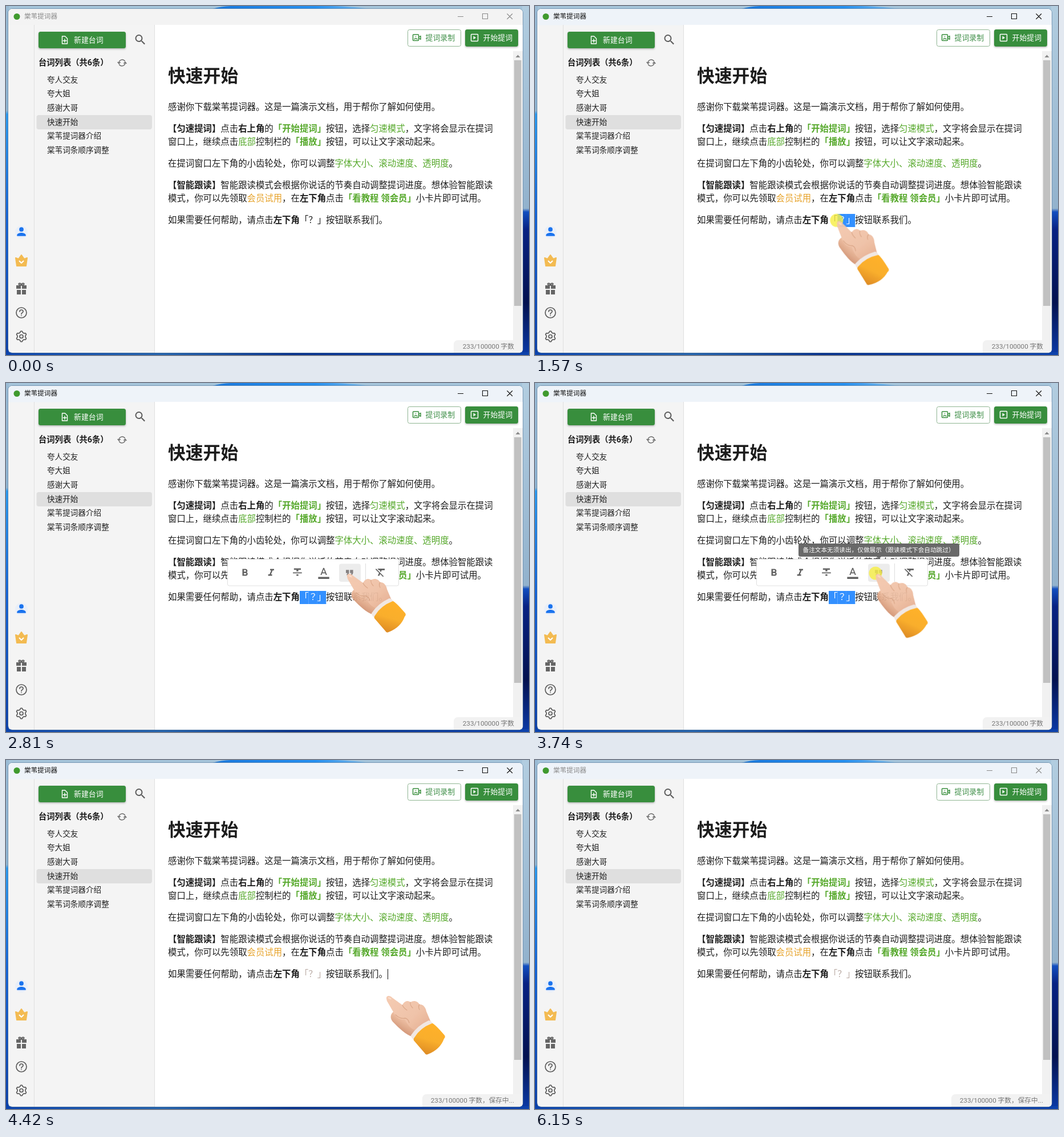
Recreate the animation shown at these times as an HTML page. Size 917 px wide and 611 px high, loop 6.22 s.

```html
<!DOCTYPE html>
<html lang="zh-CN">
<head>
<meta charset="utf-8">
<title>提词器备注演示</title>
<style>
html, body { margin: 0; width: 100%; height: 100%; overflow: hidden; }
svg { display: block; width: 917px; height: 611px; }
text {
  font-family: Roboto, "Noto Sans CJK SC", "Noto Sans CJK", sans-serif;
  white-space: pre; text-spacing-trim: space-all; font-kerning: none;
}
.doc text, .pick text { font-size: 15.4px; }
.doc { fill: #1c1c1c; }
.list { font-size: 13.6px; fill: #222; }
.btn { font-size: 12.9px; font-weight: 500; }
.status { font-size: 11.7px; fill: #757575; text-anchor: end; }
.b { font-weight: 700; }
.g { fill: #55a82a; }
.o { fill: #e6a229; }
.mid { font-family: "Noto Sans CJK TC", "Noto Sans CJK", sans-serif; }
.line { fill: none; stroke-linecap: round; stroke-linejoin: round; }
</style>
</head>
<body>
<svg viewBox="0 0 917 611" xmlns="http://www.w3.org/2000/svg">
  <defs>
    <linearGradient id="leftSky" x2="0" y2="1">
      <stop offset="0" stop-color="#9abbd5"/><stop offset=".3" stop-color="#8fb4d2"/>
      <stop offset=".31" stop-color="#2a9af0"/><stop offset=".6" stop-color="#1263d8"/>
      <stop offset="1" stop-color="#0a3ea8"/>
    </linearGradient>
    <linearGradient id="rightSky" x2="0" y2="1">
      <stop offset="0" stop-color="#b2cde0"/><stop offset=".58" stop-color="#92b2cd"/>
      <stop offset=".59" stop-color="#124ec0"/><stop offset=".64" stop-color="#082283"/>
      <stop offset=".85" stop-color="#041250"/><stop offset="1" stop-color="#0b3aa6"/>
    </linearGradient>
    <linearGradient id="bottomSky">
      <stop offset="0" stop-color="#0b43ac"/><stop offset=".3" stop-color="#2463ac"/>
      <stop offset=".55" stop-color="#07318c"/><stop offset="1" stop-color="#0d42ac"/>
    </linearGradient>
    <linearGradient id="topSky">
      <stop offset="0" stop-color="#1a78dc"/><stop offset=".65" stop-color="#2690f0"/>
      <stop offset="1" stop-color="#7fbbe8"/>
    </linearGradient>
    <linearGradient id="skin" x2="1" y2="1">
      <stop offset="0" stop-color="#f5c8ae"/><stop offset=".55" stop-color="#efc0a4"/>
      <stop offset="1" stop-color="#e0a283"/>
    </linearGradient>
    <linearGradient id="palm" x1=".7" y1=".2" x2=".2" y2=".8">
      <stop offset="0" stop-color="#eab48f" stop-opacity="0"/><stop offset="1" stop-color="#c48060"/>
    </linearGradient>
    <linearGradient id="sleeve" x1=".7" y1="0" x2=".4" y2="1">
      <stop offset="0" stop-color="#ffae1c"/><stop offset=".55" stop-color="#f9a91f"/>
      <stop offset="1" stop-color="#dc8417"/>
    </linearGradient>
    <filter id="soft" x="-10%" y="-30%" width="120%" height="170%">
      <feDropShadow dx="0" dy="1.5" stdDeviation="1.5" flood-opacity=".28"/>
    </filter>
    <clipPath id="frame"><rect x="4" y="5" width="902" height="602" rx="7"/></clipPath>
  </defs>

  <!-- desktop -->
  <rect width="917" height="611" fill="#a5c4da"/>
  <path d="M362 5C385-2 410 0 430 0H560C590 0 615 2 640 5Z" fill="url(#topSky)"/>
  <rect width="5" height="611" fill="url(#leftSky)"/>
  <rect x="905" width="12" height="611" fill="url(#rightSky)"/>
  <rect y="606" width="917" height="5" fill="url(#bottomSky)"/>
  <rect x="3.5" y="4.5" width="903" height="603" rx="7.5" fill="none" stroke="#5f7f9f" stroke-opacity=".65"/>

  <!-- window -->
  <g clip-path="url(#frame)">
    <rect x="4" y="5" width="902" height="602" fill="#f4f4f4"/>
    <rect id="bar" x="4" y="5" width="902" height="28.5" fill="#f3f3f3"/>
    <rect x="261" y="33" width="645" height="574" fill="#fff"/>
    <path d="M49.5 33V607M260.5 33V607" stroke="#dfdfdf"/>
    <rect x="889" y="79" width="17" height="528" fill="#f1f1f1"/>
    <rect x="891" y="95" width="12.5" height="430" fill="#c1c1c1"/>
    <path d="M893.5 90L897.5 85.5L901.5 90Z" fill="#8a8a8a"/>
    <path d="M785 607V593Q785 585 793 585H906V607Z" fill="#f2f2f2"/>
    <text class="status" x="891" y="599.5">233/100000 字数</text>
    <g id="saving">
      <path d="M730 607V593Q730 585 738 585H906V607Z" fill="#f2f2f2"/>
      <text class="status" x="891" y="599.5">233/100000 字数，保存中...</text>
    </g>
  </g>
  <circle cx="19" cy="18.5" r="5.5" fill="#3f9a2e"/>
  <g id="title" color="#8a8a8a">
    <text x="32" y="22" font-size="11.6" fill="currentColor">棠苇提词器</text>
    <path d="M792 18.500H802M835.500 13.500h9v9h-9ZM878.500 13.500l9.500 9.500m0-9.500l-9.500 9.500" fill="none" stroke="currentColor" stroke-width="1.1"/>
  </g>

  <!-- rail -->
  <circle cx="27" cy="396" r="11" fill="#e9eff9"/>
  <path d="M12 12a4 4 0 1 0 0-8 4 4 0 0 0 0 8zm0 2c-2.670 0-8 1.340-8 4v2h16v-2c0-2.660-5.330-4-8-4z" transform="translate(15.500 383.500) scale(.96)" fill="#1a73ee"/>
  <path d="M17 441L22 443L27 436L32 443L37 441L35 455H19Z" fill="#f3bb52" stroke="#f3bb52" stroke-width="2" stroke-linejoin="round"/>
  <path class="line" d="M23.500 446.500L27 450L30.500 446.500" stroke="#fff" stroke-width="2"/>
  <g fill="#666">
    <path d="M18 489h8v6h-8ZM28 489h8v6h-8ZM19 497h7v8h-7ZM28 497h7v8h-7Z"/>
    <path class="line" d="M27 489C22 489 21 485.500 24 485.500Q26.500 485.500 27 489Q27.500 485.500 30 485.500C33 485.500 32 489 27 489" stroke="#666" stroke-width="2"/>
  </g>
  <g class="line" stroke="#5c5c5c" stroke-width="1.7">
    <circle cx="27" cy="537" r="9"/>
    <path d="M24 535Q24 532 27 532T30 534.800Q30 536.300 28.300 537.200T27 539.500M27 542v.1"/>
    <path id="cog"/>
    <circle cx="27" cy="578.5" r="3"/>
  </g>

  <!-- script list -->
  <rect x="57" y="45" width="153" height="29" rx="3.5" fill="#388e3c" filter="url(#soft)"/>
  <path class="line" d="M98.500 53h5l4 4v9h-9ZM103 58v5.500M100.300 60.800h5.500" stroke="#fff" stroke-width="1.4"/>
  <text class="btn" x="119" y="63.5" fill="#fff">新建台词</text>
  <path d="M15.500 14h-.790l-.280-.270A6.470 6.470 0 0 0 16 9.500 6.500 6.500 0 1 0 9.500 16c1.610 0 3.090-.590 4.230-1.570l.270.280v.790l5 4.990L20.490 19zm-6 0a4.500 4.500 0 1 1 0-9 4.500 4.500 0 0 1 0 9z" transform="translate(223.500 47)" fill="#5c5c5c"/>
  <text class="b" x="57" y="104" font-size="14.3" fill="#1c1c1c">台词列表（共6条）</text>
  <g class="line" stroke="#666" stroke-width="1.4">
    <path d="M198 100A5.800 5.800 0 0 1 208.500 96.500M209 99A5.800 5.800 0 0 1 198.500 102.500"/>
    <path d="M196 98.500L198 100.700L200.300 98.700M206.700 100.300L209 98.300L211 100.500"/>
  </g>
  <rect x="53.5" y="191" width="202.500" height="25" rx="4" fill="#dfdfdf"/>
  <g class="list">
    <text x="72" y="133.7">夸人交友</text>
    <text x="72" y="158.3">夸大姐</text>
    <text x="72" y="183">感谢大哥</text>
    <text x="72" y="207.7">快速开始</text>
    <text x="72" y="232.3">棠苇提词器介绍</text>
    <text x="72" y="257">棠苇词条顺序调整</text>
  </g>

  <!-- top buttons -->
  <rect x="704.5" y="41.5" width="93" height="29" rx="3" fill="#fff" stroke="#8fb592"/>
  <g class="line" stroke="#388e3c" stroke-width="1.5">
    <rect x="713.5" y="50" width="10" height="10.5" rx="1"/>
    <path d="M716 58Q718.500 55.500 721 58M718.500 53.500v.2M724 54.500l3-2v6l-3-2"/>
  </g>
  <text class="btn" x="735.5" y="59.5" fill="#41904a" style="font-weight:400">提词录制</text>
  <rect x="805" y="41" width="93" height="30" rx="3.5" fill="#388e3c" filter="url(#soft)"/>
  <rect x="815.5" y="49.5" width="12" height="12" rx="1" fill="none" stroke="#fff" stroke-width="1.5"/>
  <path d="M819.500 52.500v6l4.500-3z" fill="#fff"/>
  <text class="btn" x="836.5" y="59.5" fill="#fff">开始提词</text>

  <!-- document -->
  <g class="doc">
    <text class="b" x="284" y="132.5" style="font-size:30.8px">快速开始</text>
    <text x="284" y="181.5">感谢你下载棠苇提词器。这是一篇演示文档，用于帮你了解如何使用。</text>
    <text x="284" y="219.5"><tspan class="b">【匀速提词】</tspan>点击<tspan class="b">右上角</tspan>的<tspan class="b g">「开始提词」</tspan>按钮，选择<tspan class="g">匀速模式</tspan>，文字将会显示在提词</text>
    <text x="284" y="242.5">窗口上，继续点击<tspan class="g">底部</tspan>控制栏的<tspan class="b g">「播放」</tspan>按钮，可以让文字滚动起来。</text>
    <text x="284" y="280.5">在提词窗口左下角的小齿轮处，你可以调整<tspan class="g">字体大小、滚动速度、透明度</tspan>。</text>
    <text x="284" y="318.5"><tspan class="b">【智能跟读】</tspan>智能跟读模式会根据你说话的节奏自动调整提词进度。想体验智能跟读</text>
    <text x="284" y="342">模式，你可以先领取<tspan class="o">会员试用</tspan>，在<tspan class="b">左下角</tspan>点击<tspan class="b g">「看教程 领会员」</tspan>小卡片即可试用。</text>
    <text x="284" y="380">如果需要任何帮助，请点击<tspan class="b">左下角</tspan><tspan id="remark" fill="#1c1c1c">「<tspan class="mid">？</tspan>」</tspan>按钮联系我们。</text>
  </g>
  <g class="pick" fill="#fff">
    <g id="pick0"><rect x="545.8" y="364" width="15.5" height="23" fill="#3390ff"/><text x="545.8" y="380">」</text></g>
    <g id="pick1"><rect x="530.4" y="364" width="15.5" height="23" fill="#3390ff"/><text class="mid" x="530.4" y="380">？</text></g>
    <g id="pick2"><rect x="515" y="364" width="15.5" height="23" fill="#3390ff"/><text x="515" y="380">「</text></g>
  </g>
  <path id="caret" d="M669.500 366V384" stroke="#111"/>

  <!-- format toolbar -->
  <g id="tools">
    <rect x="388.5" y="308.5" width="300" height="46.5" rx="3" fill="#fff" stroke="#e0e0e0"/>
    <rect id="hover" x="584" y="316.5" width="38" height="31.5" rx="4" fill="#ececec"/>
    <path d="M630.500 316V348" stroke="#ddd"/>
    <g fill="#616161">
      <path transform="translate(408.500 322) scale(.86)" d="M15.600 10.790c.970-.670 1.650-1.770 1.650-2.790 0-2.260-1.750-4-4-4H7v14h7.040c2.090 0 3.710-1.700 3.710-3.790 0-1.520-.860-2.820-2.150-3.420zM10 6.500h3a1.500 1.500 0 0 1 0 3h-3zm3.500 9H10v-3h3.500a1.500 1.500 0 0 1 0 3z"/>
      <path transform="translate(454.500 322) scale(.86)" d="M10 4v3h2.210l-3.420 8H6v3h8v-3h-2.210l3.420-8H18V4z"/>
      <path transform="translate(500.500 321) scale(.87)" d="M10 19h4v-3h-4zM5 4v3h5v3h4V7h5V4zM3 14h18v-2H3z"/>
      <path transform="translate(546.500 321) scale(.88)" d="M11 3L5.500 17h2.250l1.120-3h6.250l1.120 3h2.250L13 3zm-1.380 9L12 5.670 14.380 12zM1 21h22v4H1z"/>
      <path transform="translate(591.500 321) scale(.9)" fill="#858080" d="M6 17h3l2-4V7H5v6h3zm8 0h3l2-4V7h-6v6h3z"/>
      <path transform="translate(646 320.500) scale(.9)" d="M3.270 5L2 6.270l6.970 6.970L6.500 19h3l1.570-3.660L16.730 21 18 19.730 3.550 5.270zM6 5v.180L8.820 8h2.400l-.720 1.680 2.100 2.100L14.210 8H20V5z"/>
    </g>
  </g>
  <g id="tip">
    <path d="M465.500 281H740.500Q744 281 744 284.500V300.500Q744 304 740.500 304H607L603 308L599 304H465.500Q462 304 462 300.500V284.500Q462 281 465.500 281Z" fill="#616161" fill-opacity=".95"/>
    <text x="469.5" y="295.5" font-size="10.65" font-weight="500" fill="#fff">备注文本无须读出，仅做展示（跟读模式下会自动跳过）</text>
  </g>

  <!-- hand, drawn from its fingertip -->
  <g id="hand">
    <circle id="press" cx="-3" cy="-2" r="11.5" fill="#f7ee45" fill-opacity=".82"/>
    <g id="tilt" opacity=".94">
      <path d="M-2 4C-3-1 3-3 8 2L26 15C29 8 36 6 40 10C46 6 53 8 56 14C62 13 67 19 68 26L76 45L43 70C32 67 20 55 11 46C5 40 4 32 10 27L-1 8Z" fill="url(#skin)"/>
      <path d="M10 27C3 33 5 41 11 46C20 55 32 67 43 70L55 61C40 58 36 50 30 40C24 42 15 38 10 27Z" fill="url(#palm)"/>
      <path class="line" stroke="#cc8f6d" stroke-opacity=".6" stroke-width="1.3" d="M26 15Q28 20 34 24M40 10Q39 15 44 20M56 14Q53 18 56 23M14 32Q22 40 31 38Q36 39 38 46"/>
      <path d="M0 2Q5 0 7 5Q3 6 0 2Z" fill="#fbe0d0" fill-opacity=".8"/>
      <path d="M72 42Q76 42 80 48Q60 56 47 76Q41 73 41 68Q52 51 72 42Z" fill="#f1e6e1"/>
      <path d="M78 47Q82 47 100 68Q102 71 99 74Q92 93 71 101Q67 103 65 99L46 77Q45 74 47 72Q57 55 78 47Z" fill="url(#sleeve)"/>
    </g>
  </g>
</svg>
<script>
const LOOP = 6220;
const $ = id => document.getElementById(id);

// steps: [ms, properties, easing towards the next step]
function play(id, steps) {
  const frames = steps.map(([ms, props, easing = 'linear']) => ({ offset: ms / LOOP, easing, ...props }));
  $(id).animate(frames, { duration: LOOP, iterations: Infinity });
}

// spans: [from, to, fade in, fade out]; a zero fade is a hard change
function during(id, spans, prop = 'opacity', off = 0, on = 1) {
  const steps = [[0, { [prop]: off }]];
  for (const [from, to, fadeIn = 0, fadeOut = 0] of spans) {
    steps.push([from - 1, { [prop]: off }], [from + fadeIn, { [prop]: on }],
               [to - 1, { [prop]: on }], [to + fadeOut, { [prop]: off }]);
  }
  steps.push([LOOP, { [prop]: off }]);
  play(id, steps);
}

const at = (x, y) => ({ transform: `translate(${x}px, ${y}px)` });
const presses = [[1180, 1970], [3740, 3880]];

play('hand', [
  [0, at(785, 620)],
  [60, at(785, 620), 'cubic-bezier(.4,.1,.7,.9)'],
  [680, at(572, 408)],
  [750, at(571, 392), 'ease-out'],
  [1040, at(562, 376)],
  [1180, at(562, 376)],
  [1790, at(515, 378)],
  [1920, at(515, 378), 'cubic-bezier(.4,0,.7,.9)'],
  [2530, at(592, 345), 'ease-out'],
  [2810, at(600, 335)],
  [3880, at(600, 335), 'ease-in-out'],
  [4340, at(669, 414)],
  [5010, at(669, 414), 'cubic-bezier(.5,0,.8,.7)'],
  [5420, at(885, 620)],
  [LOOP, at(885, 620)]
]);
during('tilt', presses, 'transform', 'rotate(0deg)', 'rotate(9deg)');
during('press', presses);

during('title', [[1180, 6150]], 'color', '#8a8a8a', '#111111');
during('bar', [[1180, LOOP]], 'fill', '#f3f3f3', '#eef3f9');
[1290, 1490, 1700].forEach((from, i) => during('pick' + i, [[from, 4270]]));
during('tools', [[1970, 4270, 130, 145]]);
during('hover', [[2460, 4000]]);
during('tip', [[2940, 3950, 70, 130]]);
during('remark', [[3880, LOOP]], 'fill', '#1c1c1c', '#b9aaa3');
during('saving', [[3950, LOOP]]);
during('caret', [[4340, 4870], [5400, 5940]]);

// gear outline: six rounded teeth
const cog = [];
for (let i = 0; i < 24; i++) {
  const a = (i - .5) * Math.PI / 12, r = i % 4 < 2 ? 9.2 : 7;
  cog.push(`${(27 + r * Math.sin(a)).toFixed(1)} ${(578.5 - r * Math.cos(a)).toFixed(1)}`);
}
$('cog').setAttribute('d', `M${cog.join('L')}Z`);
</script>
</body>
</html>
```
